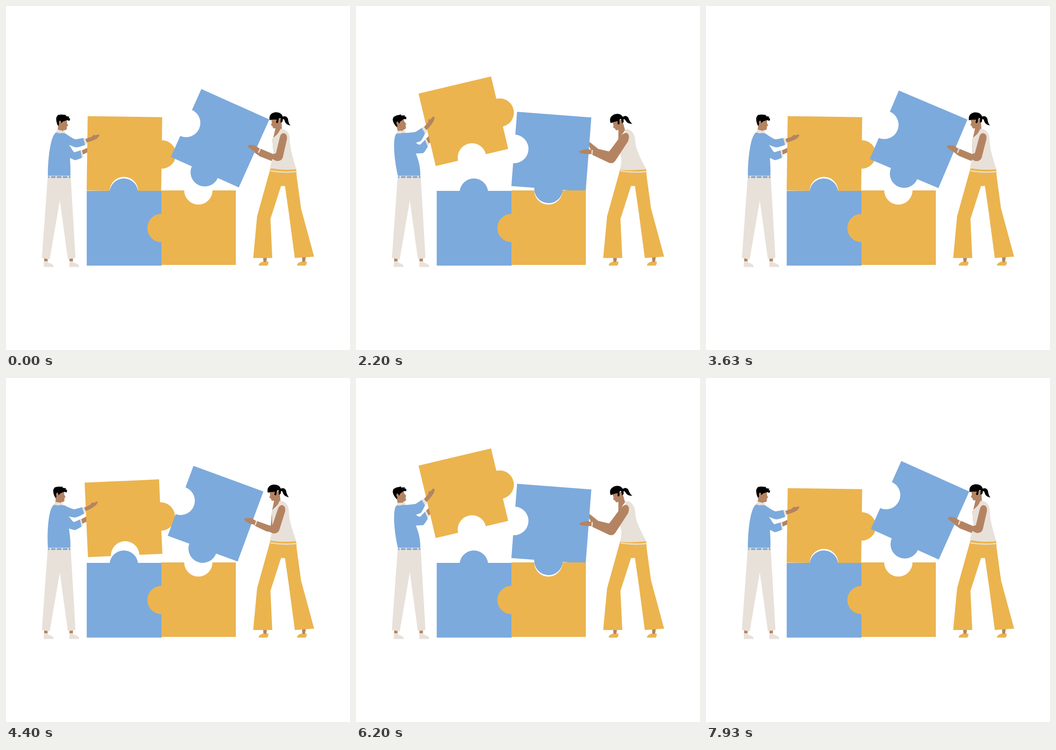
An HTML page that plays this animation: 748x748 px, repeating every 8010 ms.

```html
<!DOCTYPE html>
<html lang="en">
<head>
<meta charset="utf-8">
<title>Building the puzzle together</title>
<style>
  html, body { margin: 0; width: 100%; height: 100%; overflow: hidden; background: #fff; }
  svg { display: block; width: 100vw; height: 100vh; }
  .blue { fill: #7caadc; }
  .gold { fill: #ebb44f; }
  .cream { fill: #e8e1d9; }
  .skin { fill: #b48462; }
  .line { fill: none; stroke: #e8e1d9; }
</style>
</head>
<body>
<svg viewBox="0 0 748 748">
  <!-- far arms -->
  <g data-who="man" data-arm>
    <path class="skin" d="M165 314L178 308L178 318L167 323Z" data-to="M152 289L161 280L162 296L156 301Z"/>
    <path class="cream" d="M161 314L165 313L168 328L163 331Z" data-to="M149 291L153 289L159 300L155 306Z"/>
    <path class="blue" d="M134 300L140 306Q146 317 149 318L162 314L165 330Q152 336 149 335L136 329Z"
      data-to="M122 296L130 297Q137 303 140 301L150 291L156 306Q149 318 146 320L126 321Z"/>
  </g>
  <g data-who="woman">
    <path class="skin" d="M579 289L582 324L553 313L538 317L552 327L580 338L592 337L590 295Z"
      data-to="M576 287L553 317L529 311L510 297L510 305L518 318L550 332L582 300Z"/>
  </g>

  <!-- puzzle -->
  <path id="goldPiece" class="gold" d="M-81-81H81V-31A31 31 0 0 1 81 31V81H31A31 31 0 0 0-31 81H-81Z"/>
  <path id="bluePiece" class="blue" d="M-81-81H81V81H31A31 31 0 0 1-31 81H-81V31A31 31 0 0 0-81-31Z"/>
  <path class="blue" d="M175.500 402H225.500A31 31 0 0 1 287 402H338.500V564.500H175.500Z"/>
  <path class="gold" d="M338 401H387.500A30.700 30.700 0 0 0 449 401H499.800V563H338V513.500A30.700 30.700 0 0 1 338 452Z"/>

  <!-- man -->
  <path class="skin" d="M83 549H90.500V557H83ZM138 548H145.500V557H138Z"/>
  <path id="sock" class="cream" d="M82.500 555H90.500L91.500 558Q104 561 104 567.500H82Z"/>
  <use href="#sock" x="55.500"/>
  <path class="cream" d="M91 368H140L141 376L151 547L147 549L134.500 550L117 423L95 551L78 548L90.500 374Z"/>
  <path d="M91.500 372H140" fill="none" stroke="#7caadc" stroke-width="4" stroke-dasharray="3 3.500 9.500 3 10 3 10 3 9"/>
  <g id="manHead">
    <path class="skin" d="M116 248L133 246L132.500 254L135 260L132.500 262L132 268Q129 271 125 270L124 274L112 271L114 258Z"/>
    <path d="M113.500 261Q108 252 109.500 242L113 237L120 236L131 237L129.500 239L138 241L136 243L139.500 245L138 250L133 248L124 251L120 255Q120 249 117 249Q114 251 115.500 257Z"/>
    <path class="cream" d="M112 268.500L129 273L127.500 278L108 276Z"/>
  </g>
  <g data-who="man">
    <path class="blue" d="M109 275C97 281 91 330 91 369L140 369C141 350 139 340 139 325L137 301L129 277Q118 278 109 275Z"
      data-to="M89 277C80 280 81 325 91 369L140 369C140 345 134 330 129 318L127 301L107 276Q98 278 89 277Z"/>
  </g>
  <g data-who="man" data-arm>
    <path class="skin" d="M172 289L185 285L191 280L194 281L202 279L203 282L198 288Q188 294 174 297Z"
      data-to="M147 264L157 253L158 246L161 247L168 240L171 242L170 248Q164 260 153 270Z"/>
    <path class="cream" d="M166 288L172 286.500L176 299L171 303Z" data-to="M142 266L147 262L155 272L150 278Z"/>
    <path class="blue" d="M119 276L129 277Q147 290 152 290L168 287L172 302Q155 309 150 307L128 299Z"
      data-to="M98 276L107 276Q127 275 131 273L143 265L150 277Q144 291 140 294L120 301Z"/>
  </g>

  <!-- woman -->
  <path class="skin" d="M559 546H567.500L566 558H560ZM643.500 545H652L650 558H644.500Z"/>
  <path id="shoe" class="gold" d="M549.500 564.500Q549 559 559 555.500Q565 558 570 555Q572 560 568 564.500Z"/>
  <use href="#shoe" x="83.300"/>
  <path class="gold" d="M575 353L631 354L632 370L641.500 440L670 545L628 548L615 450L606.500 391.500H598L575 463L579 548H537.500L546 457Z"/>
  <g id="womanHead">
    <path class="skin" d="M577 246H599L600 270L581 287L586 266L581 266L579 261L576 258.500L578 254Z"/>
    <path d="M573 248Q571 233 586 231Q601 231 602.500 244L601 252L597 254V244Q592 243 592 252L590 255L587 253L589 247L580 247Z"/>
    <path d="M601 241Q609 237 613 245Q614 255 618.500 260Q608 258 606 250Q605 245 601 246Z"/>
  </g>
  <g data-who="woman">
    <path class="cream" d="M597 267L605 268Q617 274 617 290C618 315 626 335 631 355Q600 358 574 352C577 338 581 330 581 315L579 288Q591 281 597 267Z"
      data-to="M587 268L594 268Q607 275 608 292C609 315 622 335 631 355Q600 358 574 356C578 338 579 330 571 313L574 292Q585 281 587 268Z"/>
    <path class="skin" d="M595 287Q597 276 604 276.500Q612 278 611 289L602 329Q599 338 588 337L550 319L553 310L581 322L587 320Z"
      data-to="M575 286Q583 275 590 276Q598 280 593 294L567 336Q562 343 554 341L516 323L518 313L548 318L554 316Z"/>
    <path class="skin" d="M526 304L530 302L541 303L553 311L549 319L537 315L528 308Z"
      data-to="M489 315L496 312L507 310L518 314L516 322L502 321L491 319Z"/>
    <path class="line" stroke-width="2.800" d="M553 310L549 319" data-to="M517 313L516 323"/>
  </g>
  <path class="line" stroke-width="2.600" d="M575 358.500Q603 363 631 360"/>
</svg>
<script>
const LOOP = 8010, CYCLE = 4000, LIFT_END = 1500;
const numbers = /-?\d+(\.\d+)?/g;
const byId = id => document.getElementById(id);
const ease = p => (1 - Math.cos(Math.PI * Math.min(1, Math.max(0, p)))) / 2;

// Rises from 0 to 1 during the lift, then settles back to 0 at `end`.
const swing = (t, end) => t < LIFT_END
  ? ease(t / LIFT_END)
  : 1 - ease((t - LIFT_END) / (end - LIFT_END));

const parts = [...document.querySelectorAll('[data-to]')].map(el => {
  const from = el.getAttribute('d');
  const end = el.dataset.to.match(numbers).map(Number);
  return { el, from, end, group: el.parentNode.dataset };
});

function morph({ el, from, end, group }, w) {
  const arm = 'arm' in group;
  const weights = arm ? [w ** 1.5, w ** 0.85] : [w, w];
  let i = 0;
  el.setAttribute('d', from.replace(numbers, n => {
    const value = +n + (end[i] - n) * weights[i % 2];
    i++;
    return value.toFixed(2) + ' ';
  }));
}

function place(id, x, y, angle, px = 0, py = 0) {
  byId(id).setAttribute('transform',
    `translate(${x} ${y}) rotate(${angle} ${px} ${py})`);
}

// The picture changes twice in every 100 ms, at 0 and 30.
function stepTime(ms) {
  const t = Math.min(ms % LOOP, 7999);
  return (Math.floor(t / 100) * 100 + (t % 100 >= 30 ? 33.3 : 0)) % CYCLE;
}

function draw(ms) {
  const t = stepTime(ms);
  const m = swing(t, 3600), f = swing(t, CYCLE);
  const reach = { man: m / 0.75, woman: f / 0.75 };

  place('goldPiece', 257.5 - 6.5 * m - 34 * m * m, 321.5 - 102 * m + 10 * m * m, 0.8 - 20.7 * m + 2.5 * m * m);
  place('bluePiece', 465.5 - 62 * f + 15 * f * f, 287.5 + 47 * f - 13.5 * f * f, 24.2 * (1 - f));
  place('manHead', -28 * m, m, -23 * m, 119, 273);
  place('womanHead', -18 * f, 2 * f, -16 * f, 593, 270);
  parts.forEach(part => morph(part, reach[part.group.who]));
}

function tick() {
  draw(performance.now());
  requestAnimationFrame(tick);
}
tick();
</script>
</body>
</html>
```
